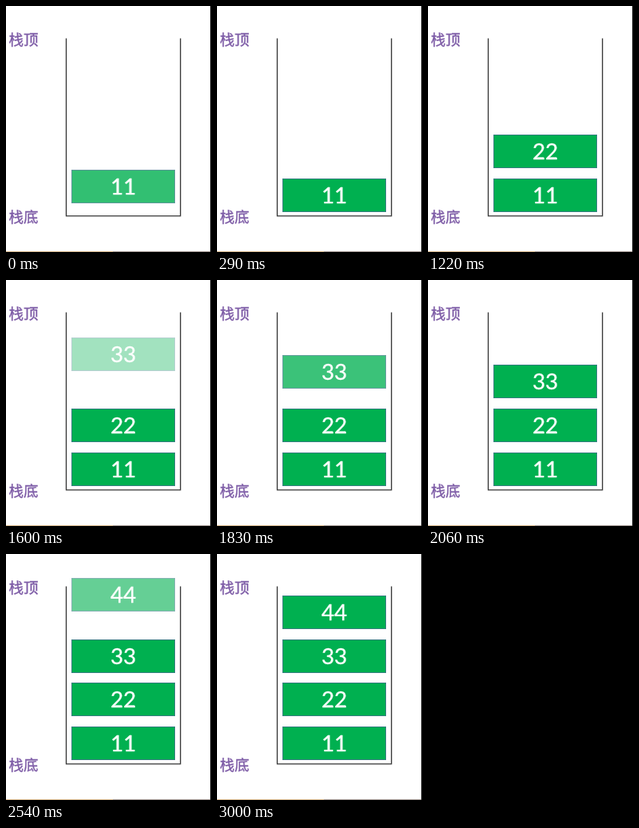
An HTML page that plays this animation: 257x308 px, repeating every 3070 ms.

```html
<!DOCTYPE html>
<html lang="zh-CN">
<head>
<meta charset="utf-8">
<title>栈</title>
<style>
  html, body { margin: 0; width: 100%; height: 100%; overflow: hidden; background: #fff; }
  svg { display: block; width: 257px; height: 308px; }
  .label {
    font: 18.5px "Noto Sans CJK SC", "Noto Sans CJK", sans-serif;
    fill: #7d5ba6; stroke: #7d5ba6; stroke-width: .35;
  }
  .wall { fill: none; stroke: #333; stroke-width: 1.3; }
  .block rect { fill: #00b050; stroke: #357f80; }
  .block text {
    font: 27.8px Lato, sans-serif; text-anchor: middle;
    fill: #fff; stroke: #fff; stroke-width: .35;
  }
</style>
</head>
<body>
<svg viewBox="0 0 257 308">
  <path d="M0 307.5H134" stroke="#d9b98c"/>
  <path d="M134 307.5H257" stroke="#a59a94"/>
  <path d="M256.5 0V308" stroke="#1f1f1f"/>
  <text class="label" x="3.5" y="49">栈顶</text>
  <text class="label" x="3.5" y="271">栈底</text>
  <path class="wall" d="M75.5 40.5V262.8H218.7V40.5"/>
  <g id="stack"></g>
</svg>
<script>
const LOOP = 3070;
const FRAMES = 40;
const STEP = LOOP / FRAMES;
const LEAD = 24;        // frames switch slightly ahead of the even grid
const FALL = 640;       // duration of one drop
const DROP = 55;        // height of one drop
const FLOOR = 216;
const SPACING = 54.67;

// The first block is already falling when the loop begins
const starts = [-421, 572, 1446, 2241];

function add(parent, name, attrs) {
  const el = document.createElementNS("http://www.w3.org/2000/svg", name);
  for (const key in attrs) el.setAttribute(key, attrs[key]);
  return parent.appendChild(el);
}

const stack = document.getElementById("stack");
const blocks = starts.map((start, i) => {
  const el = add(stack, "g", { class: "block" });
  add(el, "rect", { x: 82.5, y: 0.5, width: 129, height: 41 });
  add(el, "text", { x: 147, y: 31 }).textContent = 11 * (i + 1);
  return { el, start, rest: FLOOR - i * SPACING };
});

// Share of the drop still to fall, from 1 to 0, slowing down
function remaining(t, start) {
  const p = Math.min(Math.max((t - start) / FALL, 0), 1);
  return (1 - p) ** 1.5;
}

function draw(t) {
  const frame = Math.min(Math.floor((t + LEAD) / STEP), FRAMES - 1);
  for (const { el, start, rest } of blocks) {
    const left = remaining(frame * STEP, start);
    el.setAttribute("transform", `translate(0 ${Math.round(rest - DROP * left)})`);
    el.setAttribute("opacity", 1 - left);
  }
}

const begin = performance.now();
function tick() {
  draw((performance.now() - begin) % LOOP);
  requestAnimationFrame(tick);
}
tick();
</script>
</body>
</html>
```
